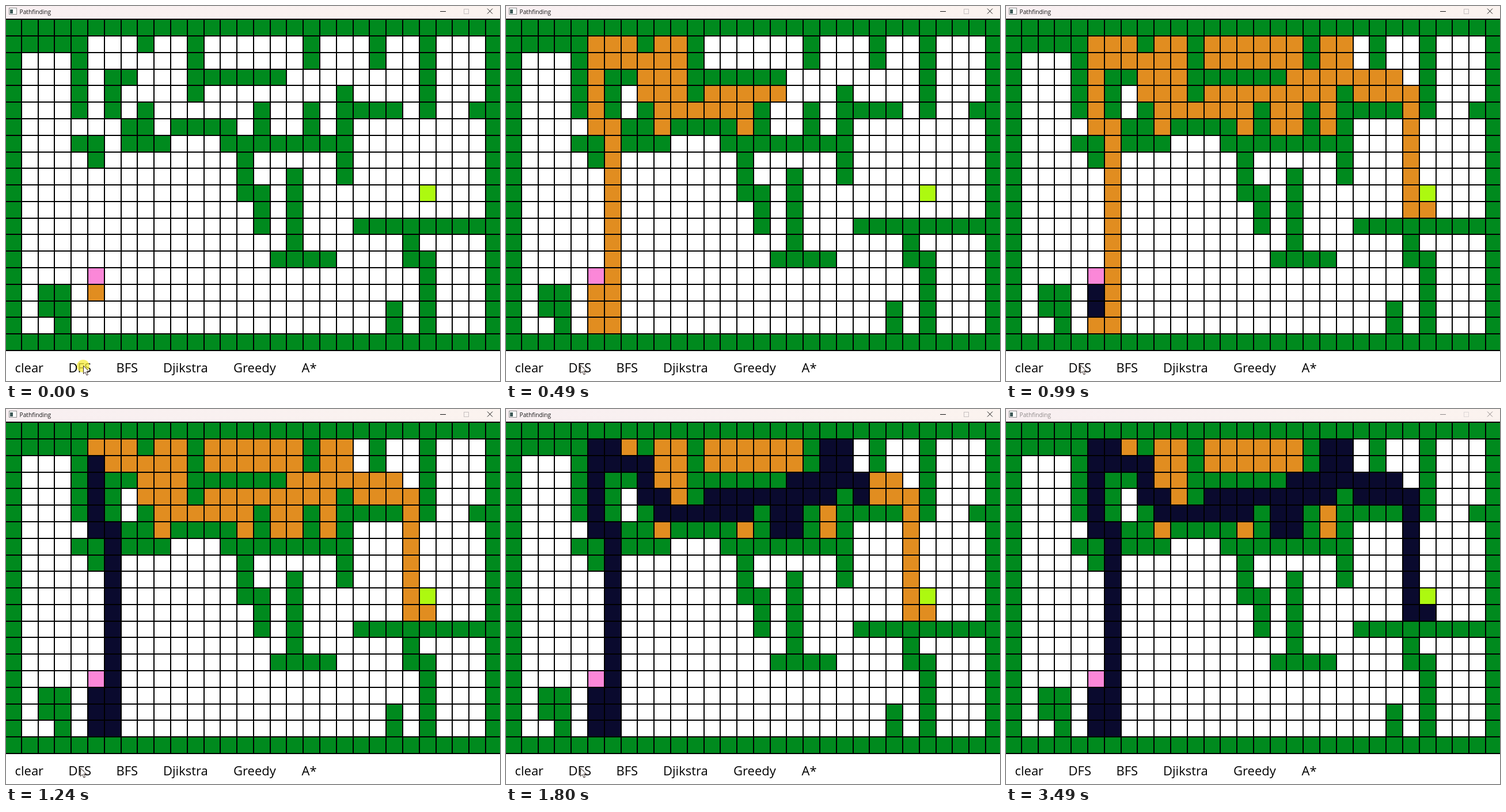
An HTML page with a canvas that plays this animation: 858 px wide and 652 px high, repeating every 3630 ms.

```html
<!DOCTYPE html>
<html lang="en">
<head>
<meta charset="utf-8">
<title>Pathfinding</title>
<style>
  html, body { margin: 0; width: 100%; height: 100%; overflow: hidden; background: #fff; }
  canvas { display: block; }
</style>
</head>
<body>
<canvas id="stage" width="858" height="652"></canvas>
<script>
const ctx = document.getElementById('stage').getContext('2d');
const LOOP = 3630, PITCH = 28.79;
const COLORS = { '#': '#008a1e', '.': '#fff', S: '#fb87d8', G: '#adf910', seen: '#e18d20', path: '#0a0a2e' };

const MAZE = [
  '##############################',
  '#####...#..#......#...#..#...#',
  '#...#......#......#...#..#...#',
  '#...#.##...######........#...#',
  '#...#.#....#........#....#...#',
  '#...#.#.#......#..#.####.#..##',
  '#......##.####.#..#.#........#',
  '#...##.###...########........#',
  '#....#........#.....#........#',
  '#.............#..#..#........#',
  '#.............##.#.......G...#',
  '#..............#.#...........#',
  '#..............#.#...#########',
  '#................#......#....#',
  '#...............####....##...#',
  '#....S...................#...#',
  '#.##.....................#...#',
  '#.##...................#.#...#',
  '#..#...................#.#...#',
  '##############################'
];

// Depth-first search, trying down, up, right, left.
const visited = [], path = [], known = new Set();
function search(col, row) {
  const kind = MAZE[row][col], key = col + ',' + row;
  if (kind === '#' || known.has(key)) return false;
  if (kind === 'G') return true;
  known.add(key);
  if (kind !== 'S') { visited.push([col, row]); path.push([col, row]); }
  if (search(col, row + 1) || search(col, row - 1) ||
      search(col + 1, row) || search(col - 1, row)) return true;
  path.pop();
  return false;
}
search(5, 15);

const colX = col => Math.round(PITCH * col - 0.95);
const rowY = row => Math.round(PITCH * row + 24.21);

function cell([col, row], color) {
  const x = colX(col), y = rowY(row);
  ctx.fillStyle = color;
  ctx.fillRect(x, y, colX(col + 1) - 2 - x, rowY(row + 1) - 2 - y);
}

function text(label, x, y, size, color) {
  ctx.font = size + 'px "Open Sans", "Noto Sans", sans-serif';
  ctx.fillStyle = color;
  ctx.fillText(label, x, y);
}

function line(color, ...points) {
  ctx.beginPath();
  points.forEach(([x, y]) => ctx.lineTo(x, y));
  ctx.strokeStyle = color;
  ctx.lineWidth = 1;
  ctx.stroke();
}

function titleBar(active) {
  const bar = ctx.createLinearGradient(0, 0, 858, 0);
  bar.addColorStop(0, '#f8eff1');
  bar.addColorStop(1, '#fbf3ef');
  ctx.fillStyle = bar;
  ctx.fillRect(0, 0, 858, 22);

  ctx.fillStyle = '#fff';
  ctx.fillRect(5.5, 3.5, 13, 11);
  ctx.strokeStyle = '#8c8c8c';
  ctx.lineWidth = 1;
  ctx.strokeRect(5.5, 3.5, 13, 11);
  ctx.fillStyle = '#3f5a58';
  ctx.fillRect(7, 6, 5, 7);

  const ink = active ? '#151515' : '#8e8989';
  text('Pathfinding', 23.5, 13.5, 10.2, ink);
  line(ink, [754, 9.5], [764, 9.5]);
  ctx.strokeStyle = active ? '#c6c0c0' : '#ddd7d7';
  ctx.strokeRect(795.5, 5.5, 8, 8);
  line(ink, [836, 4.5], [845, 13.5]);
  line(ink, [845, 4.5], [836, 13.5]);
}

function arrow(x, y) {
  const outline = [[0, 0], [0, 14], [3.2, 11], [5.6, 16.5], [8, 15.5], [5.6, 10.2], [9.8, 10]];
  ctx.beginPath();
  outline.forEach(([dx, dy]) => ctx.lineTo(x + dx + 0.5, y + dy + 0.5));
  ctx.closePath();
  ctx.fillStyle = '#fff';
  ctx.fill();
  ctx.strokeStyle = '#3a2c28';
  ctx.lineWidth = 1;
  ctx.stroke();
}

function pointer(t) {
  const glow = Math.max(0, 1 - Math.floor(t / 70) / 3);
  if (glow) {
    ctx.beginPath();
    ctx.arc(134, 626, 11, 0, Math.PI * 2);
    ctx.fillStyle = `rgba(247, 236, 60, ${0.75 * glow})`;
    ctx.fill();
  }
  if (t < 70) arrow(134, 625);
  else if (t < 2620) arrow(129, 624);
  else if (t < 2690) arrow(149, 628);
  else if (t < 2760) arrow(173, 634);
  else if (t < 2890) arrow(197, 643);
}

function draw(t) {
  // Steps last 70 ms, with two of them 10 ms shorter.
  const step = Math.floor((t + (t >= 620) * 10 + (t >= 960) * 10) / 70);
  const seenCount = 1 + 7 * step;
  const pathCount = Math.max(0, Math.floor(4.6 * (step - 13.42)));

  ctx.fillStyle = '#fff';
  ctx.fillRect(0, 0, 858, 652);
  titleBar(t < 3490);

  ctx.fillStyle = '#000';
  ctx.fillRect(0, 22, 858, 578);
  MAZE.forEach((cells, row) => [...cells].forEach((kind, col) => cell([col, row], COLORS[kind])));
  visited.slice(0, seenCount).forEach(place => cell(place, COLORS.seen));
  path.slice(0, pathCount).forEach(place => cell(place, COLORS.path));

  [['clear', 15.5], ['DFS', 108.5], ['BFS', 191.5], ['Djikstra', 273], ['Greedy', 395], ['A*', 513.5]]
    .forEach(([label, x]) => text(label, x, 637, 22, '#000'));
  pointer(t);
}

function play() {
  draw(performance.now() % LOOP);
  requestAnimationFrame(play);
}
play();
</script>
</body>
</html>
```
